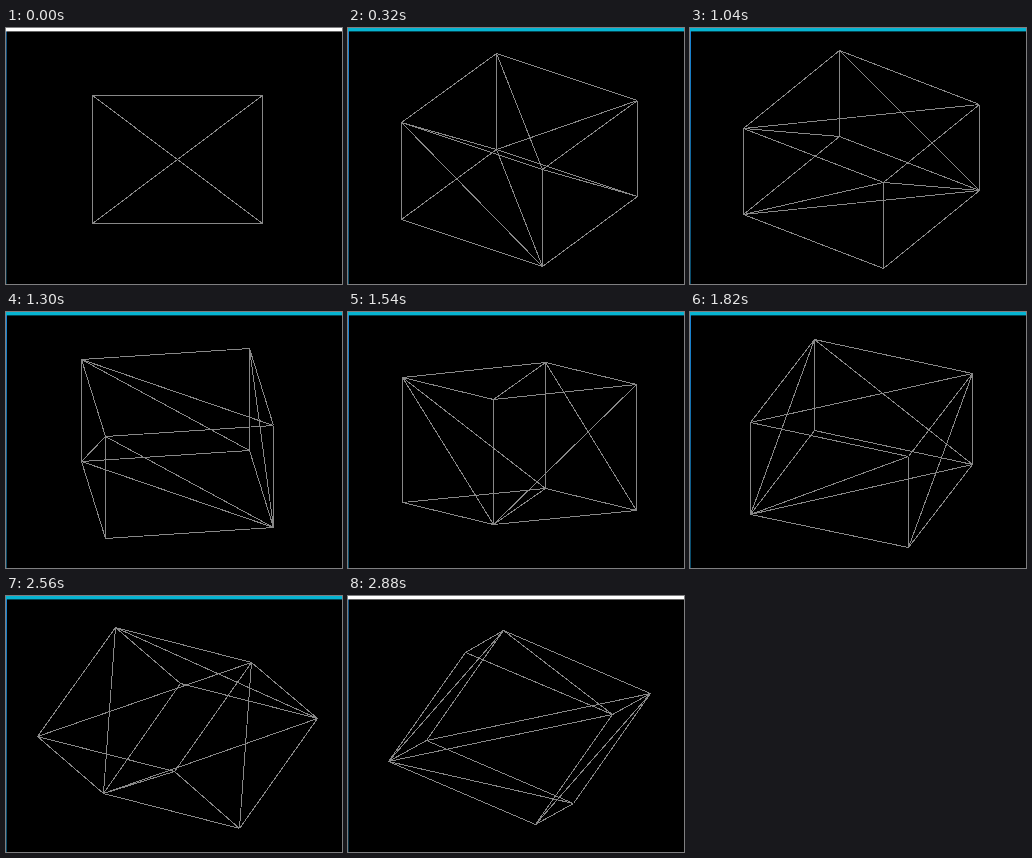
An HTML page for the animation above (3.04 s loop, 336 by 256 pixels).

```html
<!DOCTYPE html>
<html lang="en">
<head>
<meta charset="utf-8">
<title>Rotating wireframe cube</title>
<style>
  html, body { margin: 0; width: 100%; height: 100%; overflow: hidden; background: #000; }
  svg { display: block; width: 336px; height: 256px; }
</style>
</head>
<body>
<svg viewBox="0 0 336 256">
  <defs>
    <linearGradient id="edge" x1="0" y1="0" x2="0" y2="1">
      <stop offset="0" stop-color="#1a86d8"/>
      <stop offset="1" stop-color="#0a4a66"/>
    </linearGradient>
  </defs>
  <rect width="336" height="256" fill="#000"/>
  <rect id="side" width="1" height="256" fill="url(#edge)"/>
  <rect id="bar" width="336" height="3.4"/>
  <path id="wire" fill="none" stroke="#888" shape-rendering="crispEdges"/>
</svg>
<script>
const LOOP = 3040, STEP = 20;
const CENTER = [171, 131.2], SIZE = [170, 128];

// Turning points of each rotation: [time in ms, degrees]
const YAW = [[0, 0], [580, 78.3], [760, 105], [900, 105], [1040, 145.4], [1540, 32.7], [1900, -27]];
const PITCH = [[0, 0], [370, 43], [580, 30.8], [760, 0], [900, 0],
  [1040, -47.8], [1120, -54], [1540, -11.8], [2080, -73.7]];
const ROLL = [[2200, 0], [2390, 48], [2560, 25.6], [2880, -14.3]];

// Corners are numbered by bits: 1 = x, 2 = y, 4 = z
const lines = [[0, 6], [1, 7], [1, 4], [3, 6], [5, 6], [0, 3]];
for (let i = 0; i < 8; i++)
  for (const bit of [1, 2, 4]) if (!(i & bit)) lines.push([i, i | bit]);

const slope = (a, b) => (b[1] - a[1]) / (b[0] - a[0]);

// Speed at a key: zero at the ends and wherever the direction turns
function speed(keys, i) {
  if (i === 0 || i === keys.length - 1) return 0;
  const a = slope(keys[i - 1], keys[i]), b = slope(keys[i], keys[i + 1]);
  return a * b > 0 ? 2 * a * b / (a + b) : 0;
}

// Smooth angle through the keys, in radians
function angle(keys, t) {
  const first = keys[0], last = keys[keys.length - 1];
  t = Math.min(Math.max(t, first[0]), last[0]);
  const i = Math.max(1, keys.findIndex(k => k[0] >= t)) - 1;
  const [t0, a] = keys[i], [t1, b] = keys[i + 1];
  const h = t1 - t0, u = (t - t0) / h, v = 1 - u;
  const deg = a * v * v * (1 + 2 * u) + b * u * u * (1 + 2 * v)
    + h * u * v * (v * speed(keys, i) - u * speed(keys, i + 1));
  return deg * Math.PI / 180;
}

function corners(t) {
  const { sin, cos } = Math;
  const yaw = angle(YAW, t), pitch = angle(PITCH, t), roll = angle(ROLL, t);
  const project = (x, y, z) => {
    const rx = x * cos(roll) + y * sin(roll);
    const ry = y * cos(roll) - x * sin(roll);
    const depth = rx * sin(yaw) - z * cos(yaw);
    return [rx * cos(yaw) + z * sin(yaw), ry * cos(pitch) + depth * sin(pitch)];
  };
  const side = (i, bit) => (i & bit ? 0.5 : -0.5);
  return Array.from({ length: 8 }, (_, i) =>
    project(side(i, 1), side(i, 2), side(i, 4))
      .map((p, k) => Math.round(CENTER[k] + SIZE[k] * p) + 0.5));
}

const [wire, bar, side] = ["wire", "bar", "side"].map(id => document.getElementById(id));

function draw(time) {
  const t = Math.floor((time % LOOP) / STEP) * STEP;
  const pts = corners(t);
  wire.setAttribute("d", lines.map(([a, b]) => `M${pts[a]}L${pts[b]}`).join(""));
  const active = t >= 20 && t < 2880;
  bar.setAttribute("fill", active ? "#06b4d2" : "#fff");
  side.setAttribute("opacity", active ? 1 : 0.6);
}

const start = performance.now();
function tick() {
  draw(performance.now() - start);
  requestAnimationFrame(tick);
}
tick();
</script>
</body>
</html>
```
